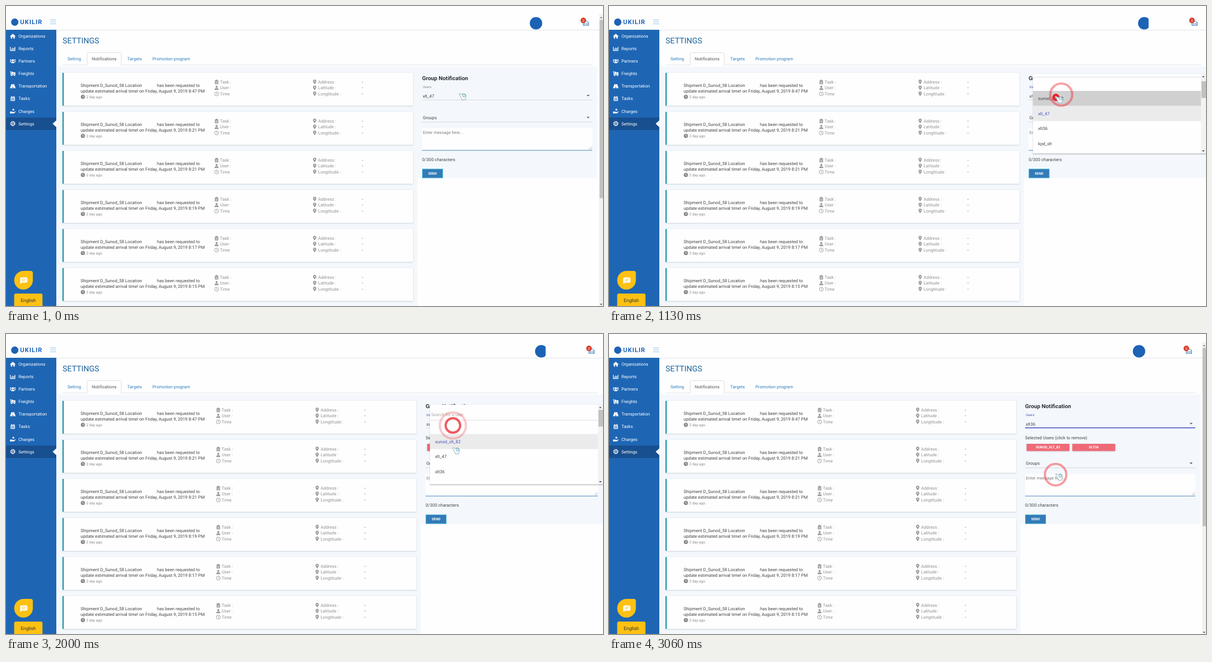
Recreate the animation shown at these times as an HTML page. Size 1056 by 530 pixels, loop 3100 ms.

```html
<!DOCTYPE html>
<html lang="en">
<head>
<meta charset="utf-8">
<title>Settings – notifications</title>
<style>
  html, body { margin: 0; width: 100%; height: 100%; overflow: hidden; background: #fefefe; }
  svg { display: block; width: 1056px; height: 530px; font-family: Roboto, sans-serif; }
  text { white-space: pre; text-rendering: geometricPrecision; }
</style>
</head>
<body>
<svg id="stage" viewBox="0 0 1056 530">
  <defs>
    <filter id="soft" x="-5%" y="-20%" width="110%" height="150%">
      <feDropShadow dx="0" dy="0.7" stdDeviation="1.2" flood-color="#345" flood-opacity=".25"/>
    </filter>
    <clipPath id="avatarClip"><rect x="900" y="15" width="54.5" height="30"/></clipPath>
    <clipPath id="listClip"><rect id="listBox" x="750" width="306" height="141"/></clipPath>
  </defs>
  <g id="page"></g>
  <g id="panel"></g>
  <g id="rings"></g>
  <g id="cursor">
    <path d="M.7.9Q1.6.2 3 1.2L5 2.2 8.4.8Q12.4 1 12.8 4.6 12.8 8 10.8 11.8H5.4Q5.2 9 3 6.6Z"
      fill="#fff" stroke="#8aa3ae" stroke-width=".9" stroke-linejoin="round"/>
    <circle cx="9" cy="4.2" r="2.5" fill="#d9f1fa" stroke="#5fa6c2" stroke-width=".9"/>
  </g>
</svg>
<script>
const LOOP = 3100;
const USERS = ['sunod_xlt_82', 'xlt_47', 'xlt36', 'kpd_xlt'];
const CLICKS = [
  { at: 320, x: 800, y: 156.5 }, { at: 1020, x: 790.5, y: 161.5 },
  { at: 1500, x: 790.5, y: 161.5 }, { at: 2270, x: 790, y: 248.5 }
];
// Each opening of the user list; dy is the scroll offset of its rows.
const OPENINGS = [
  { from: 520, to: 1215, top: 120, dy: -26.6, selected: 1, picked: 0 },
  { from: 1700, to: 2480, top: 125, dy: 0, selected: 0, picked: 2 }
];
const FADE_IN = 160, FADE_OUT = 100, ROW = 26.6;
const PATH = [[0, 801, 154], [360, 801, 154], [740, 791, 176.5], [830, 791, 176.5],
  [1000, 789.5, 159.5], [1800, 789.5, 159.5], [2220, 789.5, 246.5], [LOOP, 789.5, 246.5]];

const $ = id => document.getElementById(id);
const clamp = v => Math.max(0, Math.min(1, v));
const text = (x, y, s, fill = '#444', size = 7.7, more = '') =>
  `<text x="${x}" y="${y}" fill="${fill}" font-size="${size}" ${more}>${s}</text>`;
const rect = (x, y, w, h, fill, more = '') =>
  `<rect x="${x}" y="${y}" width="${w}" height="${h}" fill="${fill}" ${more}/>`;
const path = (d, fill, more = '') => `<path d="${d}" fill="${fill}" ${more}/>`;
const circle = (x, y, r, fill, more = '') => `<circle cx="${x}" cy="${y}" r="${r}" fill="${fill}" ${more}/>`;
const at = (x, y, s) => `<g transform="translate(${x} ${y})">${s}</g>`;
const line = (d, color, w = 1) => path(d, 'none', `stroke="${color}" stroke-width="${w}"`);
const BOLD = 'font-weight="700"';

// Icons are drawn around their centre.
const GREY = '#999';
const icon = {
  task: rect(-3, -3, 6, 7, GREY, 'rx=".8"') + rect(-1.4, -4, 2.8, 2, GREY, 'rx=".6"') +
    line('M-1.6 -.5H1.6M-1.6 1H1.6M-1.6 2.5H1.6', '#fff', .6),
  user: circle(0, -1.9, 1.9, GREY) + path('M-3.5 3.6V2Q-3.3.5-1.5.5H1.5Q3.3.5 3.5 2V3.6Z', GREY),
  clock: circle(0, 0, 3.5, 'none', `stroke="${GREY}" stroke-width=".9"`) + line('M0 -2.2V.2L1.5 1.3', GREY, .8),
  ago: circle(0, 0, 3.7, '#888') + line('M0 -2.3V.2L1.5 1.3', '#fff', .9),
  pin: path('M0 4C-.6 2.8-2.9.6-2.9-1.2A2.9 2.9 0 0 1 2.9-1.2C2.9.6.6 2.8 0 4Z', GREY) + circle(0, -1.2, 1, '#fff')
};
const MENU = [
  ['Organizations', path('M-5 0L0-4.4 5 0 4.3.7 3.5 0V4H1V1.2H-1V4H-3.5V0L-4.3.7Z', '#fff')],
  ['Reports', line('M-4.3 -3.5V3.2H4.6', '#fff', 1.1) + line('M-2 2V-.3M0 2V-2M2 2V-1M3.9 2V-3.2', '#fff', 1.2)],
  ['Partners', circle(0, -1.6, 1.9, '#fff') + circle(-3.7, -2, 1.2, '#fff') + circle(3.7, -2, 1.2, '#fff') +
    path('M-2.9 3.6Q-3 .9 0 .8T2.9 3.6ZM-5.3 1.8Q-5.3-.5-2.5-.3L-3.5 1.8ZM5.3 1.8Q5.3-.5 2.5-.3L3.5 1.8Z', '#fff')],
  ['Freights', line('M-5 -3.6H-3.4V2.2H5', '#fff', 1.1) + rect(-2.2, -3.4, 3, 4.5, '#fff') + rect(1.2, -2.4, 3.4, 3.5, '#fff') +
    circle(-2, 3.2, 1.1, '#fff') + circle(3, 3.2, 1.1, '#fff')],
  ['Transportation', path('M-2.4-3.5H-.4V-1.5H.4V-3.5H2.4L5 3.7H.6V1H-.6V3.7H-5Z', '#fff')],
  ['Tasks', rect(-3.8, -3.2, 7.6, 7.2, '#fff', 'rx=".8"') + line('M-2 -4.4V-2.4M2 -4.4V-2.4', '#fff', 1.2) +
    line('M-3.8 -1.4H3.8M-3 .6H3M-3 2.3H3M-1.2 -1V3.4M1.2 -1V3.4', '#1e66b4', .6)],
  ['Charges', circle(1, -2.6, 1.7, '#fff') + path('M-4.8.8H-2L0 1.2 2 1.8 4.6.4 5 1.2 2 4H-4.8Z', '#fff')],
  ['Settings', circle(0, 0, 3.7, 'none', 'stroke="#fff" stroke-width="1.4" stroke-dasharray="1.9 1"') +
    circle(0, 0, 3, 'none', 'stroke="#fff" stroke-width=".8"') + circle(0, 0, 1.2, 'none', 'stroke="#fff" stroke-width=".8"')]
];

function header(wide) {
  const mail = wide ? 1035.8 : 1025.8;
  return rect(0, 0, 1056, 42, '#fefefe') + line('M0 42.5H1056', '#dfe3e8') +
    circle(15.5, 28.5, 6.5, '#1c62b5') +
    text(25, 32.2, 'UKILIR', '#1c62b5', 11, BOLD + ' letter-spacing="1"') +
    line('M78 24.5H88.5M78 28H88.5M78 31.5H88.5', '#8dbbe2', .9) +
    `<g clip-path="url(#avatarClip)">${circle(wide ? 946.8 : 937.5, 30.5, 11, '#1c62b5')}</g>` +
    at(mail, 30, path('M-4.8-1L0-4.2 4.8-1V4.2H-4.8Z', '#fff', 'stroke="#2a72b8" stroke-width=".9"') +
      line('M-4.8 -.6L0 2.2L4.8 -.6M-4.5 4L-1.3 1.4M4.5 4L1.3 1.4', '#2a72b8', .8)) +
    circle(mail - 4.6, 25.5, 4.9, '#d5402b') + text(mail - 4.6, 27.6, '0', '#fff', 6, 'text-anchor="middle"');
}

function sidebar() {
  const items = MENU.map(([label, art], i) => {
    const y = 53.4 + i * 22.05;
    return at(12, y, art) + text(22, y + 2.8, label, '#fff');
  }).join('');
  return rect(0, 42, 89, 488, '#1e66b4') + rect(0, 197, 89, 22, '#184f8f') +
    path('M89 202V214L82.5 208Z', '#f7fafc') + items +
    path('M31 468H43.5Q47.5 468 47.5 472V484.6A16.5 16.5 0 1 1 31 468Z', '#fdc113') +
    path('M27 479.5H36Q37.8 479.5 37.8 481.3V487Q37.8 488.8 36 488.8H28.5L25.2 491.5V481.3Q25.2 479.5 27 479.5Z', '#fff') +
    line('M28 482.8H35.3M28 485.6H33.5', '#fdc113', 1) +
    rect(14.5, 508, 50, 26, '#fdc113', 'rx="3"') + text(39.5, 523.4, 'English', '#333', 8.3, 'text-anchor="middle"');
}

function tabs(right) {
  const link = '#2f7dbd';
  return text(100, 66, 'SETTINGS', '#17639f', 14) + line(`M100 104H${right}`, '#dde1e5', .9) +
    path('M143.5 105V84.5Q143.5 82.5 145.5 82.5H202Q204 82.5 204 84.5V105', '#fefefe', 'stroke="#d9dde1" stroke-width=".9"') +
    text(108.7, 95.5, 'Setting', link) + text(151.7, 95.5, 'Notifications', '#555') +
    text(214.5, 95.5, 'Targets', link) + text(259, 95.5, 'Promotion program', link);
}

function card(minute, i, wide) {
  const a = wide ? 375.5 : 372.5, b = wide ? 550.4 : 546;
  const info = [['task', 'Task :', 'Address :'], ['user', 'User :', 'Latitude :'], ['clock', 'Time', 'Longtitude :']];
  const rows = info.map(([art, left, right], k) => {
    const y = 16.2 + k * 10.5;
    return at(a, y, icon[art]) + text(a + 6, y + 2.7, left, '#929292') +
      at(b, y, icon.pin) + text(b + 6, y + 2.7, right, '#929292') + text(b + 83.5, y + 2.7, '-');
  }).join('');
  return at(0, 118 + i * 69,
    rect(100, 0, wide ? 626 : 620, 58, '#fefefe', 'filter="url(#soft)"') + rect(100, 0, 2, 58, '#1792a4') +
    text(132, 24.5, 'Shipment D_Sunod_58 Location') + text(267, 24.5, 'has been requested to') +
    text(132, 35, `update estimated arrival time! on Friday, August 9, 2019 8:${minute} PM`) +
    at(136, 42.4, icon.ago) + text(142, 45.2, '2 day ago.', '#8a8a8a', 6.5) + rows);
}

const chip = (x, name) => rect(x, 194, 76, 12.8, '#ef6a77', 'rx="1" filter="url(#soft)"') +
  text(x + 38, 202.3, name.toUpperCase(), '#fff', 6.1, BOLD + ' text-anchor="middle"');

function form(s) {
  const x = s.wide ? 742.3 : 736, right = s.wide ? 1047 : 1037, drop = s.chips ? 31.3 : 0;
  const arrow = y => path(`M${right - 10} ${y}h5.4l-2.7 2.8z`, '#666');
  const value = [USERS[1], USERS[0], USERS[2]][s.chips];
  let out = text(x, 131.4, 'Group Notification', '#2d3338', 9.9, BOLD) +
    text(x + 1.2, 145, 'Users', s.touched ? '#4656b8' : '#888', 6) + text(x + 1.2, 161.6, value) + arrow(157) +
    (s.focus ? line(`M${x} 165.8H${right}`, '#3f51b5', 1.5) : line(`M${x} 166H${right}`, '#d2d6da', .9));
  if (s.chips) out += text(x, 185.5, 'Selected Users (click to remove)') + chip(x + 2.6, USERS[0]);
  if (s.chips > 1) out += chip(x + 83.5, USERS[2]);
  return out + at(0, drop,
    text(x + 1.2, 199.8, 'Groups') + arrow(195.8) + line(`M${x} 205H${right}`, '#d2d6da', .9) +
    rect(x, 216, right - x, 39, '#fefefe') + line(`M${x} 255H${right}`, '#4a89c0', 1.1) +
    line(`M${right - 6} 253.5l5 -5M${right - 3} 253.5l2 -2`, '#888', .7) +
    text(x + 1.5, 225.8, 'Enter message here...', '#7d7d7d', 7.4) + text(x, 273.8, '0/300 characters') +
    rect(x + .5, 288, 36, 15.8, '#337ab7', 'stroke="#45bcd8" stroke-width=".9"') +
    text(x + 18.4, 298, 'SEND', '#fff', 6.1, BOLD + ' text-anchor="middle"'));
}

function scrollbar() {
  return rect(1049, 14, 7, 516, '#f1f1f1') + rect(1050, 24.5, 6, 315, '#c1c1c1') +
    path('M1050.6 21.5h4.4l-2.2-2.6z', '#777') + path('M1050.6 526h4.4l-2.2 2.6z', '#555');
}

function page(s) {
  const split = s.wide ? 734 : 728;
  return rect(0, 0, 1056, 530, '#fefefe') + rect(89, 107, split - 89, 423, '#f4f8fc') +
    rect(split, 107, (s.wide ? 1056 : 1046) - split, s.chips ? 229 : 197, '#f4f8fc') +
    header(s.wide) + sidebar() + tabs(s.wide ? 1048 : 1037) +
    [47, 21, 21, 19, 17, 15].map((m, i) => card(m, i, s.wide)).join('') +
    form(s) + (s.wide ? '' : scrollbar());
}

function panel(o, tip, t) {
  const closing = t >= o.to, right = closing ? 1025 : 1047, bottom = o.top + 141;
  const rows = ['', ...USERS].map((name, i) => {
    const y = 150 + i * ROW + o.dy, chosen = i === o.selected + 1, picked = i === o.picked + 1;
    const hover = closing ? picked : tip.y >= y && tip.y < y + ROW;
    const pressed = hover && picked && t > o.to - 240;
    const fill = pressed ? '#d0d0d0' : chosen ? '#ebebeb' : hover ? '#f2f2f2' : 'none';
    return (i ? rect(750, y, right - 750, ROW, fill) : '') +
      text(759, y + 16.2, name, chosen ? '#4a56bd' : '#444');
  }).join('');
  const bar = closing ? '' : rect(1047, o.top, 9, 141, '#f3f3f3') +
    rect(1048, o.top === 120 ? 133 : 134, 8, 29.5, '#c1c1c1') +
    path(`M1049 ${o.top + 5.8}h4.6l-2.3-2.6z`, '#555') + path(`M1049 ${bottom - 6}h4.6l-2.3 2.6z`, '#444');
  return rect(750, o.top, 310, 141, '#fefefe', 'filter="url(#soft)"') +
    `<g clip-path="url(#listClip)">${rows}` + text(752, 144.7 + o.dy, 'Search for a user', '#aaa', 7.6) +
    line(`M750 ${152.3 + o.dy}H${right}`, '#ddd', .9) + bar + '</g>' +
    line(`M750 ${bottom}H1056`, '#aaa', .8);
}

function pointer(t) {
  const i = Math.max(1, PATH.findIndex(p => p[0] > t));
  const [a, b] = [PATH[i - 1], PATH[i]];
  const u = clamp((t - a[0]) / (b[0] - a[0])), k = u * u * (3 - 2 * u);
  return { x: a[1] + (b[1] - a[1]) * k, y: a[2] + (b[2] - a[2]) * k };
}

function ring({ at: start, x, y }, t) {
  const age = t - start;
  if (age < 0 || age > 1200) return '';
  const alpha = clamp(1 - (age - 250) / 950);
  return circle(x, y, 2 + .0215 * age, age < 70 ? '#ee1c25' : 'none',
    `stroke="#ee1c25" stroke-width="4" opacity="${alpha}"`);
}

let lastKey = '';
function render(t) {
  const wide = OPENINGS.some(o => t >= o.from && t < o.to);
  const open = OPENINGS.find(o => t >= o.from && t < o.to + FADE_OUT);
  const chips = OPENINGS.filter(o => t >= o.to).length;
  const state = { wide, chips, touched: t >= OPENINGS[0].from, focus: chips > 0 && !open };
  const key = JSON.stringify(state);
  if (key !== lastKey) $('page').innerHTML = page(state);
  lastKey = key;

  const tip = pointer(t);
  $('panel').innerHTML = open ? panel(open, tip, t) : '';
  if (open) {
    $('listBox').setAttribute('y', open.top);
    $('panel').setAttribute('opacity', Math.min(clamp((t - open.from) / FADE_IN), clamp((open.to + FADE_OUT - t) / FADE_OUT)));
  }
  $('rings').innerHTML = CLICKS.map(c => ring(c, t)).join('');
  $('cursor').setAttribute('transform', `translate(${tip.x} ${tip.y})`);
}

const began = performance.now();
function tick() {
  render((performance.now() - began) % LOOP);
  requestAnimationFrame(tick);
}
tick();
</script>
</body>
</html>
```
